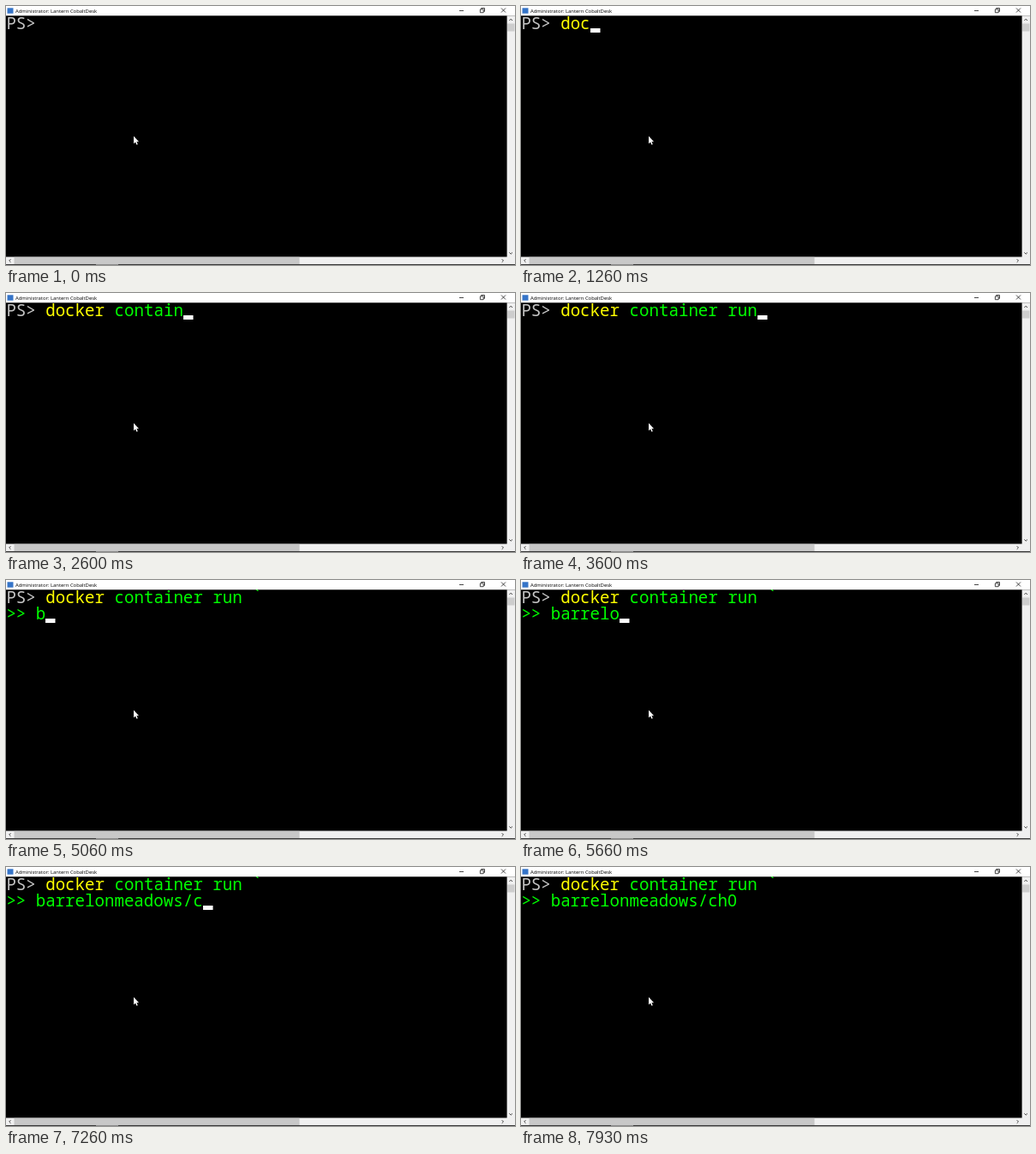
An HTML page for the animation above (8000 ms loop, 594x302 px).

```html
<!DOCTYPE html>
<html lang="en">
<head>
<meta charset="utf-8">
<title>Terminal</title>
<style>
html, body { margin: 0; width: 100%; height: 100%; overflow: hidden; background: #000; }
svg { display: block; width: 594px; height: 302px; }
.mono { font: 19.13px "Noto Sans Mono", "DejaVu Sans Mono", monospace; white-space: pre; }
.title { font: 5.9px "Open Sans", "Noto Sans", sans-serif; fill: #000; }
.zero { font-family: "Noto Sans", sans-serif; }
.gray { fill: #c4c4c4; }
.yellow { fill: #ff0; }
.green { fill: #0f0; }
.red { fill: #f00; }
.line { fill: none; stroke: #333; stroke-width: .9; }
</style>
</head>
<body>
<svg viewBox="0 0 594 302">
  <rect width="594" height="302" fill="#000"/>

  <g class="mono">
    <text class="gray" x=".4" y="26.7">PS</text>
    <text id="prompt" class="gray" x="23.3" y="26.7">&gt;</text>
    <text id="cmd" x="46.2" y="26.7"></text>
    <text id="args" class="green" x="126.6" y="26.7"></text>
    <text id="tick" x="287.3" y="25.4"></text>
    <text id="more" class="green" x=".4" y="45.7">&gt;&gt;</text>
    <text class="green" x="34.7" y="45.7"><tspan id="image"></tspan><tspan id="zero" class="zero"></tspan></text>
  </g>
  <rect id="caret" width="11.5" height="5" fill="#fff"/>

  <!-- title bar -->
  <rect width="594" height="11.3" fill="#fff"/>
  <rect x="1.5" y="2.3" width="7" height="6.4" fill="#3574c8"/>
  <text class="title" x="11" y="7.9">Administrator: Lantern CobaltDesk</text>
  <path class="line" d="M529 5.5h5M553.4 3.9h3.8v3.8h-3.8zM554.6 3.7v-1.2h3.9v3.9h-1.1M578 2.5l5 5M583 2.5l-5 5"/>

  <!-- scroll bars -->
  <rect x="584.6" y="11.3" width="9.4" height="290" fill="#f0f0f0"/>
  <rect x="585" y="20.5" width="8.5" height="9" fill="#cdcdcd"/>
  <rect y="292.5" width="594" height="9" fill="#f0f0f0"/>
  <rect x="9.5" y="292.8" width="333" height="8.2" fill="#c8c8c8"/>
  <path class="line" d="M587.4 17l1.8-1.8 1.8 1.8M587.4 287.4l1.8 1.8 1.8-1.8M5.5 295.2l-1.8 1.8 1.8 1.8M578.7 295.2l1.8 1.8-1.8 1.8"/>
  <rect y="301" width="594" height="1" fill="#3a3a3a"/>
  <rect x="105" y="301" width="26" height="1" fill="#8c8c8c"/>

  <path d="M149 151.8v8.8l2-1.8 1.4 3 1.4-.6-1.4-3h2.7z" fill="#fff"/>
</svg>
<script>
const LOOP = 8000, CELL = 11.48;
const $ = id => document.getElementById(id);

// Each word lists the times of its keys; '-' hides the caret, '+' shows it.
const bursts = [
  ['+-', 260, 800],
  ['docker c', 1060, 1130, 1260, 1330, 1400, 1460, 1530, 1660],
  ['o-nt', 1800, 1860, 1930, 2060],
  ['-ai', 2330, 2400, 2460],
  ['ner- ', 2600, 2730, 2800, 2860, 3000],
  ['-', 3200],
  ['ru-n ', 3400, 3460, 3530, 3600, 3730],
  ['`-\n-', 3930, 4130, 4330, 4600],
  ['barrel', 5060, 5130, 5200, 5260, 5400, 5460],
  ['on-m', 5600, 5730, 5800, 5860],
  ['e-+', 6000, 6000, 6060],
  ['ad-ow', 6200, 6260, 6330, 6400, 6460],
  ['s/-', 6600, 6730, 6860],
  ['ch-0-', 7260, 7400, 7400, 7730, 7930]
];
const keys = bursts.flatMap(([word, ...times]) => times.map((at, i) => ({ at, key: word[i] })));

function draw(t) {
  let typed = '', caret = false;
  for (const { at, key } of keys) {
    if (at > t) break;
    caret = key !== '-';
    if (key !== '-' && key !== '+') typed += key;
  }
  const [first, second] = typed.split('\n');
  const wrapped = second !== undefined;
  const cmd = first.slice(0, 6);
  const keyword = first === 'do';
  const open = first.endsWith('`') && !wrapped;

  $('prompt').setAttribute('class', keyword || open ? 'red' : 'gray');
  $('cmd').textContent = cmd;
  $('cmd').setAttribute('class', keyword ? 'green' : 'yellow');
  $('args').textContent = first.slice(7, 21);
  $('tick').textContent = first.slice(21);
  $('tick').setAttribute('class', open ? 'gray' : 'green');

  const path = second || '';
  $('more').style.display = wrapped ? '' : 'none';
  $('image').textContent = path.slice(0, 18);
  $('zero').textContent = path.slice(18);

  const col = wrapped ? 3 + path.length : 4 + first.length;
  $('caret').setAttribute('x', Math.round(.3 + col * CELL));
  $('caret').setAttribute('y', wrapped ? 45 : 26);
  $('caret').style.display = caret ? '' : 'none';
}

const start = performance.now();
function frame(now) {
  draw(Math.max(0, now - start) % LOOP);
  requestAnimationFrame(frame);
}
draw(0);
requestAnimationFrame(frame);
</script>
</body>
</html>
```
